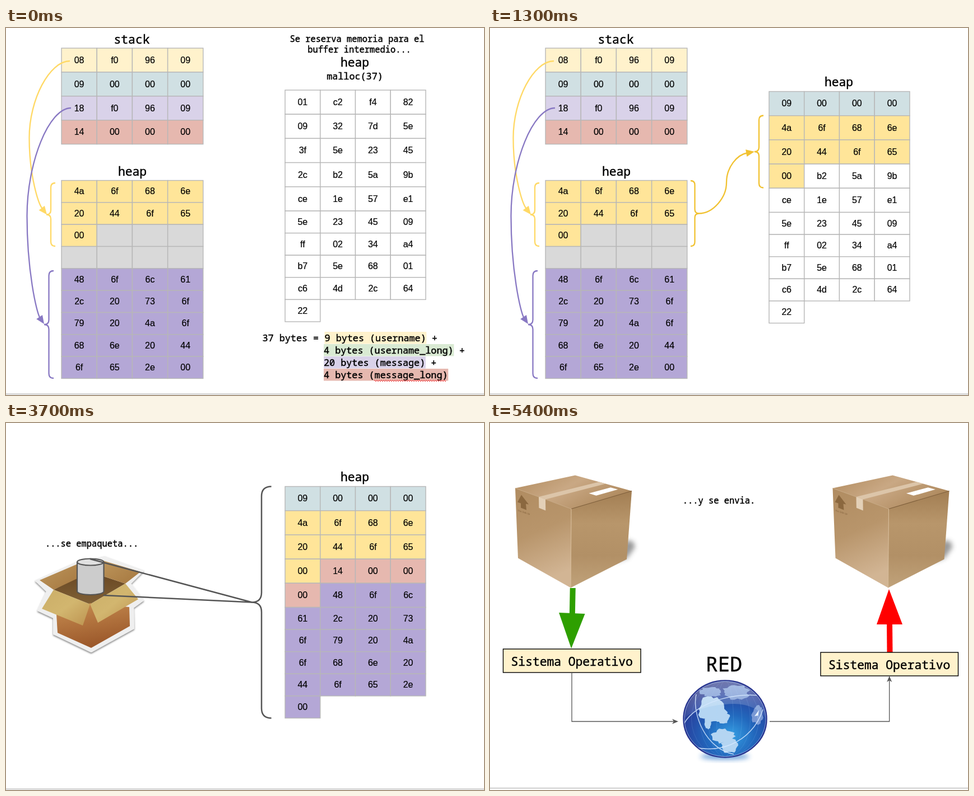
Write an HTML page that moves like this. It is 853 px wide and 656 px high and loops after 8 s.

```html
<!DOCTYPE html>
<html lang="es">
<head>
<meta charset="utf-8">
<title>Empaquetado</title>
<style>
html, body { margin: 0; width: 100%; height: 100%; overflow: hidden; background: #fff; }
svg { display: block; width: 100%; height: 100%; }
text { white-space: pre; font-family: "Noto Sans Mono", "DejaVu Sans Mono", monospace; stroke: #000; stroke-width: .45; }
.cell { font: 16px "Liberation Sans", Arial, sans-serif; text-anchor: middle; stroke-width: .2; }
.mark { font: 4px "Liberation Sans", Arial, sans-serif; fill: #80603b; stroke: none; }
</style>
</head>
<body>
<svg id="stage" viewBox="0 0 853 656">
  <defs>
    <filter id="soft" x="-50%" y="-50%" width="200%" height="200%"><feGaussianBlur stdDeviation="4"/></filter>
    <filter id="drop" x="-20%" y="-20%" width="140%" height="140%"><feDropShadow dx="0" dy="2" stdDeviation="1.8" flood-opacity=".5"/></filter>
    <radialGradient id="ocean" cx=".57" cy=".72" r=".7">
      <stop offset="0" stop-color="#35a0e4"/><stop offset=".4" stop-color="#2268bd"/><stop offset=".8" stop-color="#27429f"/><stop offset="1" stop-color="#1d2a80"/>
    </radialGradient>
    <clipPath id="globeClip"><ellipse cx="419.5" cy="529" rx="73" ry="67.5"/></clipPath>
  </defs>
</svg>
<script>
const LOOP = 8000;
const C = {
  cream: '#fff2cc', teal: '#d0e0e3', lilac: '#d9d2e9', rose: '#e6b8af', mint: '#d9ead3',
  yellow: '#ffe599', violet: '#b4a7d6', grey: '#d9d9d9', white: '#fff',
  gold: '#ffd966', amber: '#f1c232', purple: '#8878c3', cyan: '#76a5af', red: '#cc4125',
  dark: '#555', green: '#2e9f00', rule: '#d6d6d6'
};

const stage = document.getElementById('stage');

// Linear gradient from evenly spaced colours.
function gradient(id, x2, y2, ...colors) {
  const stops = colors.map((c, i) => `<stop offset="${i / (colors.length - 1)}" stop-color="${c}"/>`).join('');
  stage.querySelector('defs').insertAdjacentHTML('beforeend',
    `<linearGradient id="${id}" x1="0" y1="0" x2="${x2}" y2="${y2}">${stops}</linearGradient>`);
}
gradient('cartonLeft', .25, 1, '#b08c61', '#b8956b', '#d2b594');
gradient('cartonRight', 0, 1, '#a27e53', '#b8966b', '#b29066', '#c0a27a');
gradient('cartonTop', 1, .5, '#b18b5e', '#c9a884', '#ae895d');
gradient('openBody', .3, 1, '#c78d51', '#9c592b');
gradient('flap', 1, 1, '#cbae68', '#d2b66f', '#bd9350');
gradient('backFlap', 1, 1, '#bd965c', '#a5773f');
gradient('inside', 0, 1, '#6b4a25', '#806036');
gradient('gloss', 0, 1, '#ffffff60', '#ffffff10');

const text = (x, y, s, size, anchor = 'middle') =>
  `<text x="${x}" y="${y}" font-size="${size}" text-anchor="${anchor}">${s}</text>`;
const poly = (points, fill, more = '') => `<polygon points="${points}" fill="${fill}" ${more}/>`;
const line = (d, color, width = 2.3) =>
  `<path d="${d}" fill="none" stroke="${color}" stroke-width="${width}"/>`;
const rect = (x, y, w, h, fill, more = '') =>
  `<rect x="${x}" y="${y}" width="${w}" height="${h}" fill="${fill}" ${more}/>`;
const ellipse = (x, y, rx, ry, fill, more = '') =>
  `<ellipse cx="${x}" cy="${y}" rx="${rx}" ry="${ry}" fill="${fill}" ${more}/>`;
const place = (x, y, angle) => `transform="translate(${x} ${y}) rotate(${angle})"`;

// Curly brace from its open ends at x1 to its point at x2.
function brace(x1, x2, top, bottom, color, width = 2.3) {
  const xm = (x1 + x2) / 2, mid = (top + bottom) / 2, r = Math.abs(x2 - x1) / 2;
  return line(`M${x1} ${top}Q${xm} ${top} ${xm} ${top + r}V${mid - r}Q${xm} ${mid} ${x2} ${mid}
    Q${xm} ${mid} ${xm} ${mid + r}V${bottom - r}Q${xm} ${bottom} ${x1} ${bottom}`, color, width);
}

// Curved connector that passes xm halfway down and ends in a head at the given angle.
function connector(x1, y1, xm, x2, y2, angle, color) {
  const a = angle * Math.PI / 180, dx = Math.cos(a), dy = Math.sin(a);
  const bx = x2 - 13 * dx, by = y2 - 13 * dy, pull = Math.abs(bx - xm) / 2;
  const height = y2 - y1;
  return line(`M${x1} ${y1}C${(x1 + xm) / 2} ${y1} ${xm} ${y1 + height / 4} ${xm} ${y1 + height / 2}
    C${xm} ${y1 + height * .75} ${bx - pull * dx} ${by - pull * dy} ${bx} ${by}`, color) +
    poly('0,0 -15,6.5 -15,-6.5', color, place(x2, y2, angle));
}

const steps = (n, at) => Array.from({ length: n + 1 }, (_, i) => at(i));
const repeat = (n, value) => Array(n).fill(value);
const runs = (...pairs) => pairs.flatMap(([n, color]) => repeat(n, color));

const hex = n => n.toString(16).padStart(2, '0');
const word = n => [0, 8, 16, 24].map(shift => hex(n >>> shift & 255));
const chars = s => [...s + '\0'].map(c => hex(c.charCodeAt(0)));

// Bytes and fills run row by row; a short last row is allowed.
function table(xs, ys, bytes, fills) {
  let cells = '', labels = '';
  bytes.forEach((byte, i) => {
    const col = i % 4, row = i >> 2, x = xs[col], y = ys[row];
    const w = xs[col + 1] - x, h = ys[row + 1] - y;
    cells += rect(x, y, w, h, fills[i] || C.white, 'stroke="#b7b7b7" stroke-width="1.4"');
    labels += `<text class="cell" x="${x + w / 2}" y="${y + h / 2 + 5.3}">${byte}</text>`;
  });
  return cells + labels;
}

const leftX = steps(4, i => 99 + i * 63.2);
const rightX = steps(4, i => 498 + i * 62.75);
const rightY = top => steps(10, i => top + 43.2 * Math.min(i, 5) + 39.6 * Math.max(i - 5, 0));

const name = chars('John Doe'), message = chars('Hola, soy John Doe.');
const header = word(name.length);
const full = [...header, ...name, ...word(message.length), ...message];
const junk = '01c2f48209327d5e3f5e23452cb25a9bce1e57e15e234509ff0234a4b75e6801c64d2c6422'.match(/../g);

const buffer = (top, bytes, ...fills) =>
  table(rightX, rightY(top), [...bytes, ...junk.slice(bytes.length)], runs(...fills));

const source = () =>
  text(224.5, 28, 'stack', 21.3) + text(225.5, 264, 'heap', 21.3) +
  table(leftX, steps(4, i => 36 + i * 42.9),
    [0x0996f008, name.length, 0x0996f018, message.length].flatMap(word),
    runs([4, C.cream], [4, C.teal], [4, C.lilac], [4, C.rose])) +
  table(leftX, steps(9, i => 272.5 + i * 39.33), [...name, ...repeat(7, ''), ...message],
    runs([9, C.yellow], [7, C.grey], [20, C.violet])) +
  brace(88, 72, 277, 390, C.gold) + brace(85, 68, 434, 626, C.purple) +
  connector(114, 59, 41.5, 73, 333.5, 52, C.gold) +
  connector(116, 143, 37.5, 68, 529, 56, C.purple);

function reserve() {
  const wave = steps(31, i => `${657 + i * 4} 630.5q1 -3 2 0t2 0`).map(p => 'M' + p).join('');
  const sizes = [
    ['9 bytes (username)', ' +', C.cream], ['4 bytes (username_long)', ' +', C.mint],
    ['20 bytes (message)', ' +', C.lilac], ['4 bytes (message_long)', '', C.rose]
  ];
  return text(626.5, 25, 'Se reserva memoria para el', 15.4) +
    text(630.5, 44, 'buffer intermedio...', 15.4) +
    text(622.5, 69, 'heap', 21.3) + text(622.5, 92, 'malloc(37)', 16.8) +
    text(457.5, 559.5, '37 bytes = ', 16.8, 'start') +
    sizes.map(([label, plus, color], i) => {
      const x = i ? 567 : 568.5, y = 559.5 + i * 22;
      return rect(x, y - 16.5, label.length * 10.1, 21.5, color) + text(x, y, label + plus, 16.8, 'start');
    }).join('') + line(wave, '#e33', 1);
}

function openBox() {
  const left = '85,298', right = '213,287', front = '150,324', back = '174,274';
  const outline = '53,282 126,249 176,239 245,264 222,287 245,317 227,330 228,367 152,409 85,377 85,348 57,335 73,301';
  return poly(outline, '#efefef', 'filter="url(#drop)" stroke="#efefef" stroke-width="2" stroke-linejoin="round"') +
    poly(`${left} 127,276 ${back} ${right} ${front}`, 'url(#inside)') +
    poly(`60,281 130,251 127,278 ${left}`, 'url(#backFlap)') +
    poly(`170,245 240,266 ${right} ${back}`, 'url(#backFlap)') +
    poly('90,342 150,322 220,329 221,363 152,402 92,375', 'url(#openBody)') +
    poly(`${left} ${front} 137,362 64,332`, 'url(#flap)') +
    poly(`${right} 236,315 164,357 ${front}`, 'url(#flap)');
}

const packing = () =>
  text(153, 221, '...se empaqueta...', 15.4) + openBox() +
  `<path d="M127 248.5V301A23.7 6 0 0 0 174.5 301V248.5" fill="#ccc" stroke="${C.dark}" stroke-width="2.2"/>` +
  ellipse(150.7, 248.5, 23.7, 6, '#e0e0e0', `stroke="${C.dark}" stroke-width="2.2"`) +
  line('M150 243L439 320.5L174 308', C.dark, 2.5) +
  brace(473.5, 438.5, 113.5, 527.5, C.dark, 2.5);

const mix = (p, q, t) => p.map((v, i) => v + (q[i] - v) * t);

// Part of a face with corners a b (near edge) and d c (far edge).
function patch([a, b, c, d], u0, u1, v0, v1, fill) {
  const at = (u, v) => mix(mix(a, b, u), mix(d, c, u), v);
  return poly([at(u0, v0), at(u1, v0), at(u1, v1), at(u0, v1)].join(' '), fill);
}

function carton(dx = 0, dy = 0) {
  const west = [316, 255], north = [423, 232], east = [524, 260], south = [416, 292];
  const foot = [415, 433], footWest = [321, 380], footEast = [515, 382];
  const top = [west, south, east, north], left = [west, south, foot, footWest];
  const edge = (p, q, color) => line(`M${p}L${q}`, color, 1.1);
  return `<g ${place(dx, dy, 0)}>` +
    poly('490,388 514,348 526,350 530,360 516,380', '#555', 'opacity=".6" filter="url(#soft)"') +
    patch(top, 0, 1, 0, 1, 'url(#cartonTop)') +
    patch(left, 0, 1, 0, 1, 'url(#cartonLeft)') +
    patch([south, east, footEast, foot], 0, 1, 0, 1, 'url(#cartonRight)') +
    edge(west, south, '#c5a680') + edge(south, east, '#7c5c38') + edge(south, foot, '#d6bb98') +
    patch(top, .42, .54, 0, 1, '#dcc5a9') + patch(left, .42, .54, 0, .15, '#e3d0b7') +
    patch(top, .7, .83, .57, .93, '#fff') +
    '<path d="M327 267l13 17-5-1 1 11-10-4v-8l-6-2z" fill="#8b683f"/>' +
    `<text class="mark" ${place(320, 296, 17)}>This Side Up</text></g>`;
}

function random(seed) {
  return () => (seed = seed * 16807 % 2147483647) / 2147483647;
}

// Ragged coastline around an ellipse.
function land(x, y, rx, ry, color, seed) {
  const next = random(seed * 7919);
  const points = steps(25, i => {
    const a = i / 26 * Math.PI * 2, r = .78 + next() * .36;
    return `${x + Math.cos(a) * rx * r},${y + Math.sin(a) * ry * r}`;
  });
  return poly(points.join(' '), color);
}

function globe() {
  const pale = '#b4d5f2', dim = '#7898d4';
  return ellipse(419, 596, 44, 6, '#2b76c8', 'opacity=".65" filter="url(#soft)"') +
    ellipse(419.5, 529, 74, 68.5, 'url(#ocean)', 'stroke="#27348f" stroke-width="2.5"') +
    '<g clip-path="url(#globeClip)">' +
    land(396, 511, 26, 22, pale, 3) + land(415, 527, 13, 10, pale, 5) + land(389, 535, 6, 12, pale, 7) +
    land(417, 560, 21, 13, pale, 11) + land(427, 576, 15, 15, pale, 13) +
    land(439, 481, 25, 13, dim, 17) + land(395, 480, 20, 9, dim, 19) + land(477, 522, 10, 18, dim, 23) +
    '<path d="M345 529A74 68 0 0 1 494 529Q470 497 419 503Q370 507 345 529Z" fill="url(#gloss)"/>' +
    steps(4, i => ellipse(419.5, 529, 15 + i * 15, 68, 'none', 'stroke="#a8d8ff" opacity=".15"')).join('') +
    '<g opacity=".85">' +
    line('M346 538C365 500 440 478 493 489M368 485C360 520 385 583 435 592M348 573C400 598 468 573 487 512', '#d5e8ff', 1.5) +
    '</g>' + poly('480,513 472,524 478,523 477,533', '#e8f3ff') + '</g>' +
    ellipse(419.5, 529, 72.5, 67, 'none', 'stroke="#a9bde8" opacity=".7"');
}

function network() {
  const system = (x, y) => rect(x, y, 245.5, 42, C.cream, 'stroke="#000" stroke-width="1.4"') +
    text(x + 122.7, y + 29.5, 'Sistema Operativo', 21.3);
  const tip = (x, y, angle) => poly('0,0 -11,4.5 -8,0 -11,-4.5', C.dark, place(x, y, angle));
  return carton(-271, -138.5) + carton(295.5, -138.5) +
    text(408.5, 144, '...y se envia.', 15.4) +
    line('M147.7 295L146.8 342', C.green, 10) + poly('123,339 169.5,341 145,403', C.green) +
    line('M713.5 410L713 358', '#f00', 10) + poly('712,297 690,360 736,360', '#f00') +
    system(23.5, 404) + system(590, 410) +
    line('M146 446V533.5H328M499 533.5H712.7V460', C.dark, 1.3) +
    tip(336, 533.5, 0) + tip(712.7, 452, -90) +
    text(417.5, 444, 'RED', 36) + globe();
}

const rule = (y, height = 2.5) => rect(0, y, 853, height, C.rule);
const filled = [[4, C.teal], [9, C.yellow], [4, C.rose], [20, C.violet]];

// Each layer: start, end, drawing.
const layers = [
  [0, 4700, rule(653)],
  [0, 3700, source()],
  [0, 500, reserve() + buffer(111, [])],
  [500, 4700, text(622.5, 104, 'heap', 21.3)],
  [500, 1300, buffer(111, header, ...filled.slice(0, 1)) +
    connector(336, 100, 416, 497, 133, 4, C.cyan)],
  [1300, 2100, buffer(113.5, [...header, ...name], ...filled.slice(0, 2)) +
    brace(358, 373, 273, 390, C.amber) + brace(488, 472, 156.5, 285.5, C.amber) +
    connector(373, 331.5, 422, 472, 221, -10, C.amber)],
  [2100, 2900, buffer(113.5, full, ...filled.slice(0, 3)) +
    connector(331, 186, 453, 575, 263.5, 2, C.red)],
  [2900, 4700, buffer(113.5, full, ...filled)],
  [2900, 3700, brace(358, 372, 431.5, 623.5, C.purple) + brace(490, 470, 286, 527.5, C.purple) +
    connector(372, 528, 444, 468, 406.5, -64, C.purple)],
  [3700, 4700, packing()],
  [4700, 5400, carton() + rule(655, 1)],
  [5400, LOOP, network() + rule(651.5)]
];

stage.insertAdjacentHTML('beforeend', layers.map(([, , drawing]) => `<g class="layer">${drawing}</g>`).join(''));
const nodes = [...stage.querySelectorAll('.layer')];

const startTime = performance.now();
function show() {
  const t = (performance.now() - startTime) % LOOP;
  layers.forEach(([from, to], i) => {
    nodes[i].style.display = t >= from && t < to ? '' : 'none';
  });
  requestAnimationFrame(show);
}
show();
</script>
</body>
</html>
```
